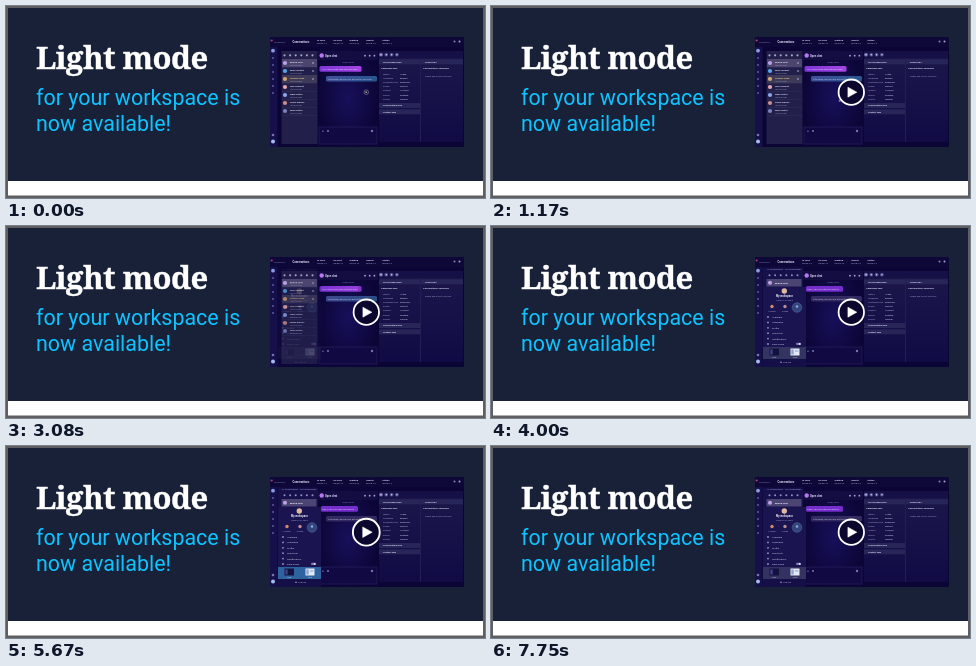
Animation of 479x192 px, one loop 8 s. Source, as an HTML page:

```html
<!DOCTYPE html>
<html lang="en">
<head>
<meta charset="utf-8">
<title>Light mode</title>
<style>
html, body { margin: 0; width: 100%; height: 100%; overflow: hidden; background: #5f5f61; }
svg { display: block; width: 100%; height: 100%; }
.title { font: 700 31px "Noto Serif", serif; letter-spacing: -.55px; fill: #fff; stroke: #fff; stroke-width: .4px; }
.sub { font: 21.45px Roboto, sans-serif; fill: #0fc3ff; }
.ui { font-family: Roboto, sans-serif; }
</style>
</head>
<body>
<svg viewBox="0 0 479 192" xmlns="http://www.w3.org/2000/svg">
  <defs>
    <linearGradient id="violet"><stop stop-color="#7e35d8"/><stop offset="1" stop-color="#a544e4"/></linearGradient>
    <linearGradient id="steel"><stop stop-color="#40509a"/><stop offset="1" stop-color="#285690"/></linearGradient>
    <linearGradient id="panel" x2="0" y2="1"><stop stop-color="#1b174a"/><stop offset="1" stop-color="#110b45"/></linearGradient>
    <radialGradient id="glow"><stop stop-color="#17105a"/><stop offset="1" stop-color="#0c0638"/></radialGradient>
    <clipPath id="shot"><rect x="264" y="31" width="194" height="110"/></clipPath>
  </defs>
  <rect width="479" height="192" fill="#5f5f61"/>
  <rect x="2" y="2" width="475" height="173" fill="#182138"/>
  <rect x="2" y="175" width="475" height="14.5" fill="#fff"/>
  <text class="title" x="30" y="63">Light mode</text>
  <text class="sub" x="30" y="99">for your workspace is</text>
  <text class="sub" x="30" y="125">now available!</text>
  <g class="ui" clip-path="url(#shot)">
    <g id="base"></g>
    <g id="menu"></g>
    <circle id="ripple" cx="269" cy="135" fill="none" stroke="#cfd4ff" stroke-width=".7"/>
    <path id="cursor" d="M0 0v3l.9-.8 1.4-.1z" fill="#d5d3f2"/>
  </g>
  <g id="play">
    <circle r="12.7" fill="#0a0628" fill-opacity=".8" stroke="#fff" stroke-width="1.8"/>
    <path d="M-3.4-5v10L5.6 0z" fill="#fff" stroke="#fff" stroke-width=".5" stroke-linejoin="round"/>
  </g>
</svg>
<script>
const $ = id => document.getElementById(id);
const rect = (x, y, w, h, fill, extra = '') =>
  `<rect x="${x}" y="${y}" width="${w}" height="${h}" fill="${fill}" ${extra}/>`;
const dot = (x, y, r, fill, extra = '') =>
  `<circle cx="${x}" cy="${y}" r="${r}" fill="${fill}" ${extra}/>`;
const label = (x, y, s, fill = '#a6a2cf', size = 2.5, extra = '') =>
  `<text x="${x}" y="${y}" font-size="${size}" fill="${fill}" ${extra}>${s}</text>`;
const row = (n, fn) => Array.from({ length: n }, (_, i) => fn(i)).join('');
const bold = 'font-weight="700"', mid = 'text-anchor="middle"';

function frame() {
  const stats = ['In calls', 'On hold', 'Waiting', 'Agents', 'Status'];
  return rect(264, 31, 194, 110, '#0b0536') +
    rect(264, 31, 194, 10, '#0e0838') +
    rect(264, 41, 7.5, 100, '#15104a') +
    dot(265.7, 34.5, 1.1, '#b23c78') +
    label(268, 36.5, 'Workspace', '#8581b5', 2.2) +
    label(286.5, 36.6, 'Conversations', '#e8e6ff', 2.6, bold) +
    row(5, i => label(311 + i * 16.3, 35.2, stats[i], '#dcd9f4', 2.5, bold) +
      label(311 + i * 16.3, 38.4, '00:0' + (i + 2) + ':14', '#b8b4df')) +
    dot(448.5, 35.5, 1, '#8581b5') + dot(453.5, 35.5, 1, '#a5a2cc') +
    dot(267, 44.7, 1.9, '#8e9ae0') +
    row(6, i => dot(267, 52 + i * 7, 1.1, '#5a5698')) +
    dot(267, 129, 1.3, '#7673ae') + dot(267, 135.5, 2, '#a5bbee');
}

function chat(soft) {
  return rect(312, 41.5, 60, 99.5, 'url(#glow)') +
    rect(312, 45, 60, 9, '#130d42') +
    dot(315.7, 49.5, 2.2, '#b678ee') +
    label(319, 50.6, 'Open chat', '#dedbfa', 2.7, bold) +
    row(3, i => dot(359 + i * 4.7, 49.7, .9, '#aaa6d8')) +
    label(342, 57.2, 'Today, 09:30', '#8480b6', 2.1, mid) +
    rect(soft ? 315 : 313.5, 60, soft ? 37 : 42, 5.7, soft ? '#752dcb' : 'url(#violet)', 'rx="1.5"') +
    label(316, 63.8, soft ? 'Hello, can you help me with it?' : 'Hi, I need some help with my plan.', '#eadcff', 2.4) +
    rect(320, 70, 51, 5.5, soft ? '#322a60' : 'url(#steel)', 'rx="1.5"') +
    label(322, 73.7, 'Of course, let me look at that for you now', '#c8d6f3', 2.4) +
    rect(313, 121, 58, 17, '#110a42', 'stroke="#2c2766" stroke-width=".5"') +
    label(316, 126, '+', '#aaa6d8', 3.5) + dot(322, 125, .9, '#8581bd') +
    dot(366, 125, 1.2, '#7772b2');
}

function details() {
  const fields = ['Status', 'Language', 'Customer type', 'Phone', 'Subject', 'Device', 'Priority'];
  const values = ['Active', 'English', 'Returning', 'Not set', 'Account', 'Desktop', 'Normal'];
  const head = (x, y, w, s) => rect(x, y, w, 5, '#282558') +
    label(x + 4, y + 3.4, s, '#dcdaf7', 2.4, bold);
  return rect(373, 52, 41, 84, 'url(#panel)') + rect(415, 52, 42, 84, 'url(#panel)') +
    rect(373, 45, 84, 7, '#151046') +
    row(4, i => dot(375 + i * 5.3, 48.7, 1.9, i ? '#4c4a88' : '#6c69a8') + dot(375 + i * 5.3, 48.7, .7, '#d5d2f2')) +
    head(373, 53.3, 41, 'CUSTOMER INFO') + head(415, 53.3, 42, 'SUMMARY') +
    label(375, 62.7, 'Campaign info', '#dad8f3', 2.5, bold) +
    row(7, i => label(377, 69 + i * 4.1, fields[i], '#aaa6d2', 2.3) +
      label(394, 69 + i * 4.1, values[i], '#dedcf4', 2.3)) +
    head(373, 97, 41, 'Conversation info') + head(373, 103.3, 41, 'Contact info') +
    label(417, 62.7, 'Conversation summary', '#dad8f3', 2.5, bold) +
    label(419, 70.5, 'Please add a short note here', '#a09cc9', 2.1) +
    rect(414.3, 52, .6, 84, '#35316e');
}

function list() {
  const names = ['Billing chat', 'Web contact', 'Service desk', 'Live request', 'New visitor', 'Sales inquiry', 'Web visitor'];
  const tints = ['#b9a0e8', '#55a8e6', '#d4a575', '#e6a7b1', '#8ca6ed', '#cb8e88', '#7d81be'];
  return rect(275.5, 45, 36, 93, '#22204a') +
    row(6, i => dot(278.5 + i * 5.6, 49.3, 1.1, '#a5a2cc')) +
    rect(276, 53, 35, 8, '#4c466e') + rect(276, 69, 35, 8, '#3e3b58') +
    row(7, i => {
      const y = 57 + i * 8;
      return dot(279, y, 2.1, tints[i]) +
        label(284, y - .1, names[i], i === 2 ? '#e4be82' : '#dedcf2', 2.5, bold) +
        label(284, y + 2.6, 'Last message', '#918db7', 1.9) +
        (i < 3 ? dot(307, y, .8, '#c8c1e8') : '') +
        rect(276, y + 4, 35, .3, '#3a3669');
    });
}

function menu() {
  const items = ['Available', 'Language', 'Profile', 'Shortcuts', 'Notifications', 'Dark mode'];
  return frame() + chat(true) + details() +
    rect(272, 41.5, 40, 99, '#17114b') +
    label(276, 44.4, 'All conversations', '#aaa6d5', 2.1) + label(294, 44.4, 'My conversations', '#aaa6d5', 2.1) +
    row(6, i => dot(278.5 + i * 5.6, 49.3, 1, '#9490c6')) +
    rect(275.5, 53, 35, 7.5, '#4b4573') + dot(279, 56.7, 2, '#bea4e6') +
    label(284, 57.6, 'Billing chat', '#f0eefc', 2.5, bold) +
    rect(272, 61, 43, 60, '#1a1550') +
    dot(293.3, 65, 2.7, '#dfb9a2') +
    label(293.5, 71.2, 'My workspace', '#f0eefc', 2.6, mid + ' ' + bold) +
    label(293.5, 74.5, 'Signed in as agent', '#9792c8', 2.1, mid) +
    dot(281, 80.5, 1.7, '#d48b69') + dot(294, 80.5, 1.7, '#c18a90') +
    dot(306, 81.5, 4.8, '#33457c', 'stroke="#506599" stroke-width=".6"') + dot(306, 80.5, 1.3, '#86a7dc') +
    label(281, 85.6, '12 open', '#b7b2df', 2.1, mid) + label(294, 85.6, '4 done', '#b7b2df', 2.1, mid) +
    row(6, i => dot(277, 91 + i * 5.4, .9, '#9893cc') +
      label(281, 92 + i * 5.4, items[i], '#d5d2f0', 2.5)) +
    rect(305, 116.8, 5, 2.2, '#7f7bb0', 'rx="1.1"') + dot(308.7, 117.9, .9, '#f0effb') +
    rect(272, 121, 43, 12, '#343260') +
    rect(272, 121, 43, 12, '#2e639f', 'id="hover"') +
    rect(278.5, 122.5, 9.5, 7, '#14113f') + rect(279.3, 123.5, 2.4, 5, '#41418a') +
    rect(299.5, 122.5, 9, 7, '#e3e8f5') + rect(300.3, 123.5, 2.4, 5, '#87a6d0') +
    rect(304, 124.5, 3.4, 1, '#83a2dc') +
    label(283.3, 132.3, 'Dark', '#c9d4ee', 2, mid) + label(304, 132.3, 'Light', '#c9d4ee', 2, mid) +
    rect(272, 133, 43, 8, '#150f47') +
    dot(290, 136.2, .8, '#a5a1d3') + label(292, 137.1, 'Log out', '#c2bfe3', 2.4);
}

$('base').innerHTML = frame() + list() + chat(false) + details();
$('menu').innerHTML = menu();

const LOOP = 8000, STEP = 1000 / 12;
const ramp = (t, a, b) => Math.min(1, Math.max(0, (t - a) / (b - a)));
const ease = p => p * p * (3 - 2 * p);

function playScale(t) {
  const intro = 1 - .82 * Math.exp(-t / 190) * Math.cos(t / 118);
  const u = Math.max(0, t - 5250);
  return intro + .22 * Math.exp(-u / 430) * Math.sin(u * Math.PI / 540);
}

function render(time) {
  // The picture advances twelve times a second.
  const t = Math.floor((time % LOOP + 3.4) / STEP) * STEP;
  $('play').setAttribute('transform', `translate(360.3 86.2) scale(${playScale(t)})`);

  const move = ease(ramp(t, 750, 2500));
  $('cursor').setAttribute('transform', `translate(${361 - 92 * move} ${87 + 44 * move})`);
  $('cursor').setAttribute('opacity', t > 800 ? .6 * (1 - ramp(t, 2500, 2750)) : 0);

  const tap = ramp(t, 2500, 2920);
  $('ripple').setAttribute('r', .5 + 2.2 * tap);
  $('ripple').setAttribute('opacity', Math.sin(Math.PI * tap) * .8);

  $('menu').setAttribute('opacity', ramp(t, 3000, 3416));
  const hover = .9 * ramp(t, 3990, 4333) + .1 * ramp(t, 4416, 4900) - ease(ramp(t, 5800, 6500));
  $('hover').setAttribute('opacity', Math.max(0, hover));
}

function tick() {
  render(performance.now());
  requestAnimationFrame(tick);
}
tick();
</script>
</body>
</html>
```
